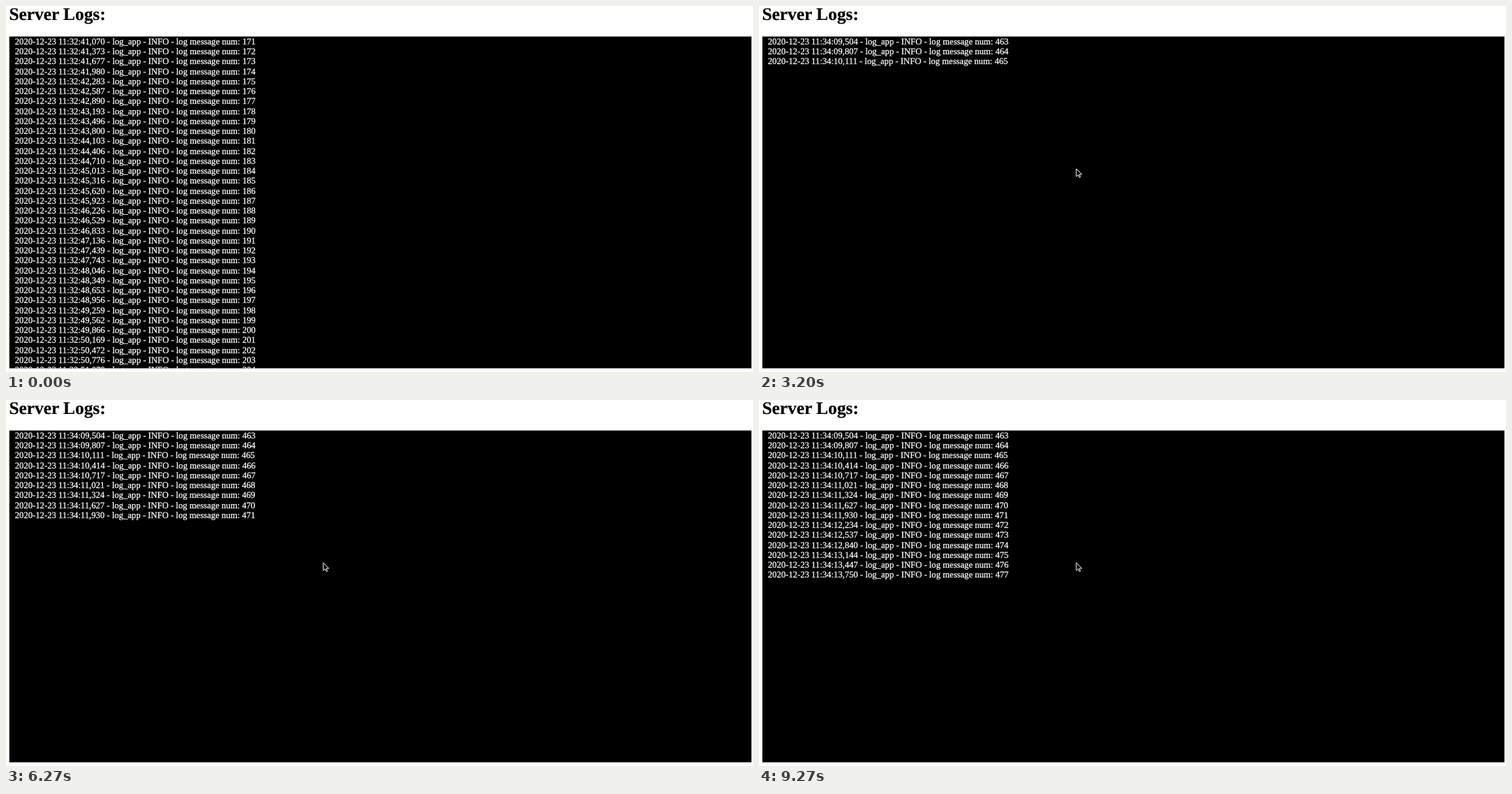
Recreate the animation shown at these times as an HTML page. Size 1069 by 524 pixels, loop 9.34 s.

```html
<!DOCTYPE html>
<html lang="en">
<head>
<meta charset="utf-8">
<title>Server Logs</title>
<style>
  html, body { margin: 0; width: 100%; height: 100%; overflow: hidden; background: #fff; }
  svg { display: block; }
  text {
    font-family: "Liberation Serif", Times, serif;
    text-rendering: geometricPrecision;
    white-space: pre;
  }
  .title { font-size: 25.333px; font-weight: 700; stroke: #000; stroke-width: .2; }
  .log { font-size: 12.667px; fill: #fff; stroke: #fff; stroke-width: .25; }
</style>
</head>
<body>
<svg width="1069" height="524" viewBox="0 0 1069 524">
  <clipPath id="panel"><rect x="4.75" y="43.67" width="1062" height="475"/></clipPath>
  <text class="title" x="4.5" y="20.4">Server Logs:</text>
  <rect x="4.75" y="43.67" width="1062" height="475"/>
  <g clip-path="url(#panel)">
    <g id="old" class="log"></g>
    <g id="fresh" class="log"></g>
  </g>
  <path id="cursor" d="M454 233V244.2L456.6 241.8L458.4 245.6L460 244.9L458.3 241.1H461.9Z"
        stroke="#fff" stroke-linejoin="round"/>
</svg>
<script>
  const LOOP = 9340, CLEAR = 1800, CURSOR = 2270;
  const LINE = 14.25, LEFT = 12.75, BASE = 54.75;
  const LOG_STEP = 303.3;      // ms between logged messages
  const TICK = 1000 / 15;      // screen refresh

  const get = id => document.getElementById(id);
  const show = (el, on) => el.setAttribute("visibility", on ? "visible" : "hidden");

  // Seconds and milliseconds in the logger's style, as 09,504
  const stamp = ms =>
    (ms / 1000).toFixed(3).padStart(6, "0").replace(".", ",");

  // Lines arrive at an even pace, held until the next refresh
  const arrival = i =>
    Math.round(Math.round((2208 + 504.3 * i) / TICK) * TICK / 10) * 10;

  function addLogs(group, count, minute, start, first) {
    return Array.from({ length: count }, (_, i) => {
      const line = document.createElementNS("http://www.w3.org/2000/svg", "text");
      const time = stamp(start + Math.round(LOG_STEP * i));
      line.setAttribute("x", LEFT);
      line.setAttribute("y", BASE + LINE * i);
      line.textContent =
        `2020-12-23 11:${minute}:${time} - log_app - INFO - log message num: ${first + i}`;
      group.append(line);
      return line;
    });
  }

  const old = get("old"), cursor = get("cursor");
  addLogs(old, 34, 32, 41070, 171);
  const fresh = addLogs(get("fresh"), 15, 34, 9504, 463);

  function draw(now) {
    const t = now % LOOP;
    show(old, t < CLEAR);
    show(cursor, t >= CURSOR);
    fresh.forEach((line, i) => show(line, t >= arrival(i)));
    requestAnimationFrame(draw);
  }
  draw(0);
</script>
</body>
</html>
```
